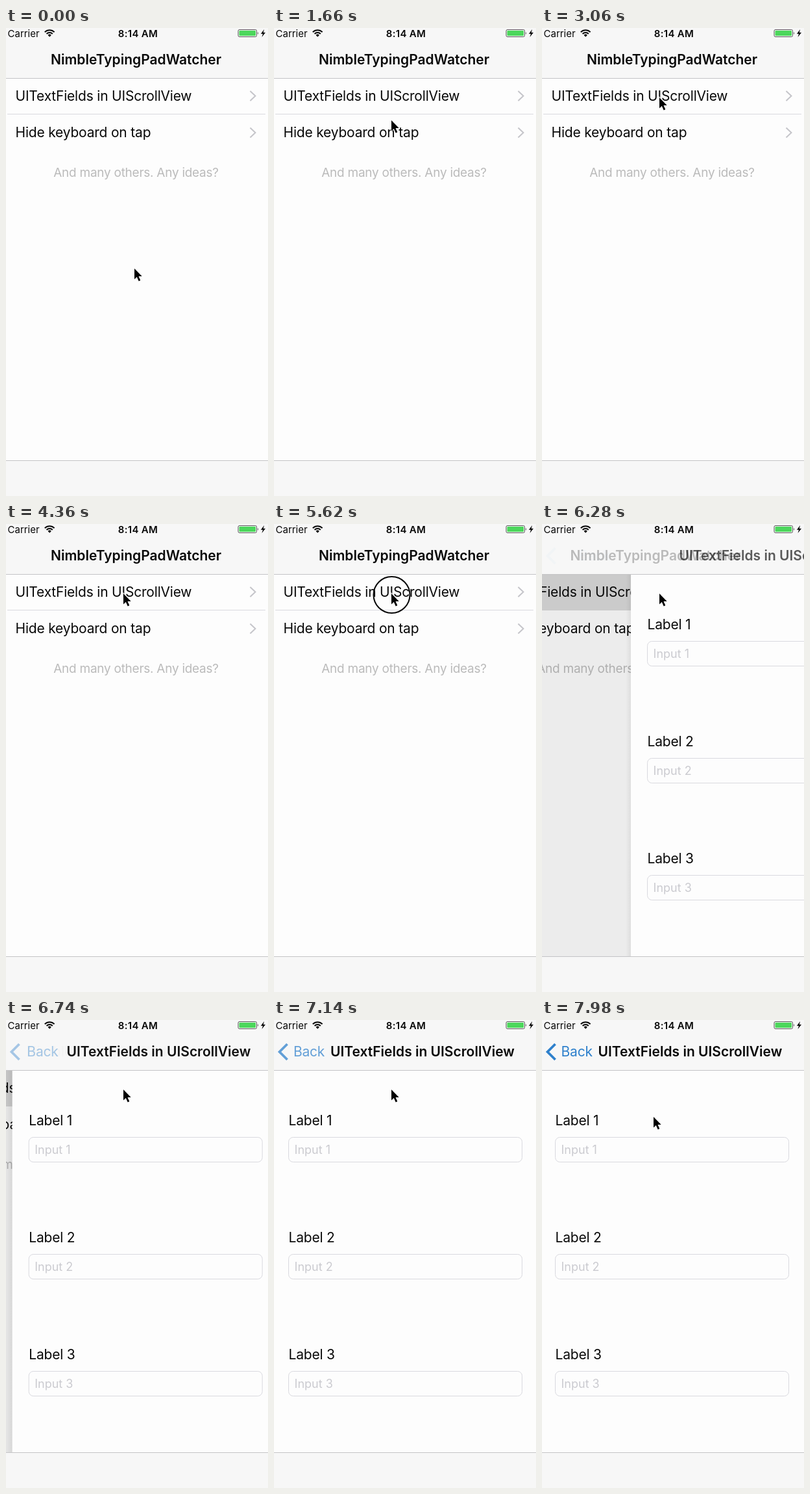
Recreate the animation shown at these times as an HTML page. Size 404 px wide and 720 px high, loop 8 s.

```html
<!DOCTYPE html>
<html lang="en">
<head>
<meta charset="utf-8">
<title>Keyboard demo</title>
<style>
  html, body { margin: 0; width: 100%; height: 100%; overflow: hidden; background: #fdfdfd; }
  svg { display: block; width: 100vw; height: 100vh; }
  text { font: 400 21px Inter, "Open Sans", sans-serif; letter-spacing: -.2px; fill: #080808; }
  .title { font-weight: 600; letter-spacing: 0; }
  .status { font-size: 15px; letter-spacing: 0; }
  .time { font-weight: 600; letter-spacing: .3px; }
  .note { font-size: 19px; letter-spacing: -.26px; fill: #bbb; }
  .hint { font-size: 18px; letter-spacing: 0; fill: #cbcbd0; }
  .back { fill: #2e80cc; }
  .line { fill: none; stroke: #c5c5ca; stroke-width: 2; }
</style>
</head>
<body>
<svg viewBox="0 0 404 720">
  <defs>
    <linearGradient id="shadow">
      <stop offset="0" stop-opacity="0"/>
      <stop offset="1" stop-opacity=".06"/>
    </linearGradient>
  </defs>

  <rect width="404" height="720" fill="#fdfdfd"/>
  <g id="list">
    <rect id="highlight" x="-5" y="77" width="540" height="56" fill="#d9d9d9"/>
    <path id="separator" class="line" d="M2 132.5H400" style="stroke:#d9d9df;stroke-width:1"/>
    <text x="14.5" y="112">UITextFields in UIScrollView</text>
    <text x="14.5" y="168">Hide keyboard on tap</text>
    <text class="note" x="200.5" y="229" text-anchor="middle">And many others. Any ideas?</text>
    <path class="line" d="M376.5 97l8 7.5-8 7.5M376.5 153.5l8 7.5-8 7.5"/>
  </g>
  <rect id="dim" y="77" width="404" height="589"/>

  <g id="page">
    <rect x="-13" y="77" width="8" height="589" fill="url(#shadow)"/>
    <rect x="-5" y="77" width="412" height="589" fill="#fdfdfd"/>
    <g id="fields"></g>
  </g>

  <rect width="404" height="77" fill="#f7f7f7"/>
  <rect y="666" width="404" height="54" fill="#f7f7f7"/>
  <path class="line" d="M0 77.5H404M0 665.5H404" style="stroke:#c4c4c6;stroke-width:1"/>

  <text id="oldTitle" class="title" x="200.5" y="56" text-anchor="middle">NimbleTypingPadWatcher</text>
  <text id="newTitle" class="title" x="86.5" y="56">UITextFields in UIScrollView</text>
  <path id="backArrow" d="M20.5 37L8.5 49l12 12" fill="none" stroke="#2e80cc" stroke-width="3.8"/>
  <text id="backLabel" class="back" x="29.5" y="56">Back</text>

  <text class="status" x="2.5" y="13.5">Carrier</text>
  <text class="status time" x="203.5" y="13.5" text-anchor="middle">8:14 AM</text>
  <g fill="none" stroke="#080808" stroke-width="2">
    <path d="M59.8 6.3a10.5 10.5 0 0 1 14.8 0M62.6 9a6.5 6.5 0 0 1 9.2 0"/>
    <path d="M64.6 10.9a3.7 3.7 0 0 1 5.2 0L67.2 13.7z" fill="#080808" stroke="none"/>
  </g>
  <rect x="358" y="2.5" width="28.5" height="11" rx="2" fill="none" stroke="#555"/>
  <rect x="359.5" y="4" width="25.5" height="8" rx="1" fill="#4cd75c"/>
  <path d="M388 6q2 2 0 4z" fill="#555"/>
  <path d="M398 2l-5 7h3l-1.5 5 5.5-7h-3.2z" fill="#080808"/>

  <circle id="press" cx="181.5" cy="109" r="28" fill="none" stroke="#080808" stroke-width="2"/>
  <path id="cursor" d="M0 0V16.5L3.8 13 6.7 19.5 9.3 18.3 6.5 12H11.7z" fill="#000" stroke="#fdfdfd" stroke-width="1.6" paint-order="stroke"/>
</svg>

<script>
const LOOP = 8000, PRESS = 5600, SELECT = 5760, RELEASE = 5960, PUSH = 6065;
const PAGE_WIDTH = 412, SETTLE_RATE = 4.93 / 1000;
// Cursor stops: time, x, y
const stops = [[300, 198, 370], [1560, 181, 142], [1700, 181, 142], [2400, 181, 107],
               [7440, 181, 107], [7980, 172, 149]];

const el = id => document.getElementById(id);
const clamp = v => Math.min(1, Math.max(0, v));
const ease = v => v * v * (3 - 2 * v);
const shift = (id, x, y = 0) => el(id).setAttribute("transform", `translate(${x} ${y})`);
const alpha = (id, v) => el(id).setAttribute("opacity", v);

el("fields").innerHTML = [1, 2, 3].map((n, i) => `
  <g transform="translate(0 ${i * 180})">
    <text x="20.5" y="161.5">Label ${n}</text>
    <rect x="20.5" y="180.5" width="360" height="38" rx="7" fill="none" stroke="#d9d9df"/>
    <text class="hint" x="29.5" y="205.5">Input ${n}</text>
  </g>`).join("");

function cursorAt(t) {
  let [, x, y] = stops[0];
  for (let i = 1; i < stops.length; i++) {
    const [t0, x0, y0] = stops[i - 1], [t1, x1, y1] = stops[i];
    const k = ease(clamp((t - t0) / (t1 - t0)));
    x += (x1 - x0) * k;
    y += (y1 - y0) * k;
  }
  return [x, y];
}

function draw(t) {
  const left = t < PUSH ? 1 : Math.exp(-(t - PUSH) * SETTLE_RATE);
  const done = 1 - left;
  const backAlpha = clamp((t - 6250) / 1200);

  shift("cursor", ...cursorAt(t));
  alpha("press", +(t >= PRESS && t < RELEASE));
  alpha("highlight", +(t >= SELECT));
  alpha("separator", +(t < SELECT));

  shift("list", -done * PAGE_WIDTH * .3);
  alpha("dim", done * .1);
  shift("page", left * PAGE_WIDTH);
  alpha("page", +(t >= PUSH));

  shift("oldTitle", -done * 39);
  alpha("oldTitle", left ** 1.3);
  shift("newTitle", 486 * left ** 1.275);
  alpha("newTitle", done);
  shift("backLabel", left * 80);
  alpha("backLabel", backAlpha);
  alpha("backArrow", backAlpha);
}

function frame() {
  draw(performance.now() % LOOP);
  requestAnimationFrame(frame);
}
frame();
</script>
</body>
</html>
```
